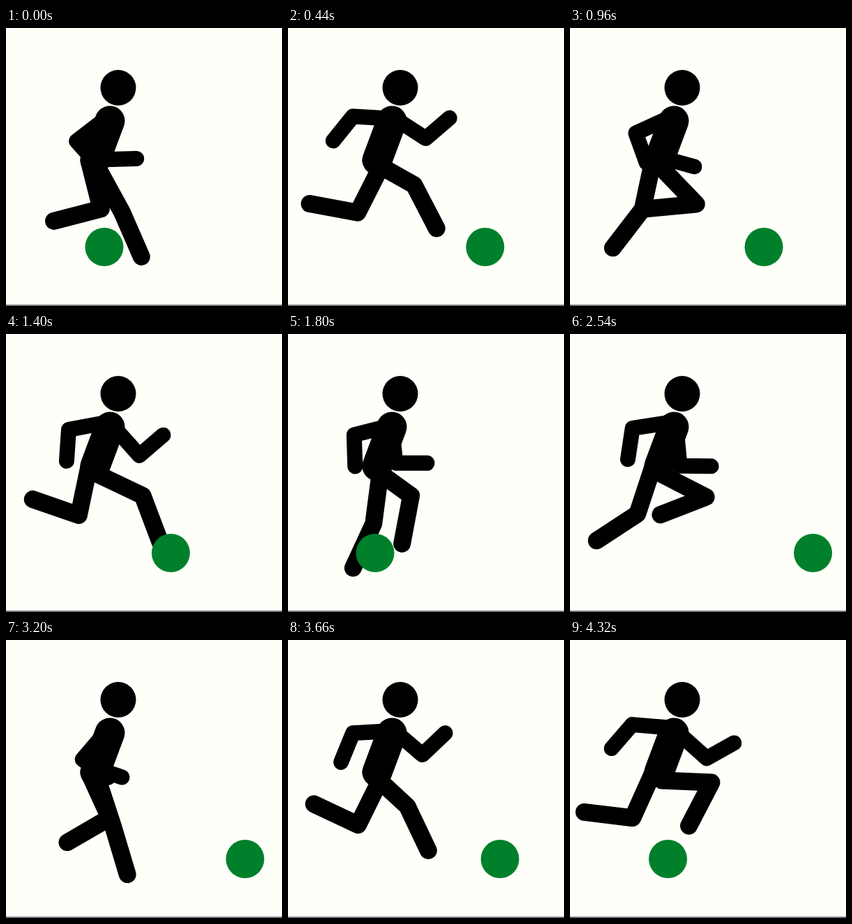
Write an HTML page with a canvas that moves like this. It is 396 px wide and 398 px high and loops after 4420 ms.

```html
<!DOCTYPE html>
<html lang="en">
<head>
<meta charset="utf-8">
<title>Runner and ball</title>
<style>
html, body { margin: 0; height: 100%; overflow: hidden; background: #fffffa; }
canvas { display: block; }
</style>
</head>
<body>
<canvas id="stage" width="396" height="398"></canvas>
<script>
const ctx = document.getElementById('stage').getContext('2d');
const TAU = 2 * Math.PI;
const LOOP = 4420, LAST = 92, STRIDES_PER_STEP = 0.0299;

// Swing in degrees from straight down (positive to the right), as a function of
// the stride phase: a mean, one wave per stride and a smaller one at twice the pace
const swing = (mean, size, peak, size2, peak2) => phase => (mean
  + size * Math.cos(TAU * (phase - peak))
  + size2 * Math.cos(2 * TAU * (phase - peak2))) * Math.PI / 180;

const leg = { length: [71, 70], width: 25, lag: 0 };
const arm = {
  length: [59, 45], width: 22,
  upper: swing(-28, 75, .29, 11, .33),
  lower: swing(52, 84, .292, 14, .455)
};
const LIMBS = [
  { ...leg, x: 119, y: 190, upper: swing(16, 45, .24, 5, .22), lower: swing(-38, 70, .337, 6, .14) },
  { ...leg, x: 132, y: 201, upper: swing(24, 57, .786, 8, .24), lower: swing(-49, 72, .939, 6, .02) },
  { ...arm, x: 148, y: 126, lag: 0 },
  { ...arm, x: 152, y: 130, lag: .51 }
];

function disc(x, y, r, color) {
  ctx.fillStyle = color;
  ctx.beginPath();
  ctx.arc(x, y, r, 0, TAU);
  ctx.fill();
}

function stroke(width, points) {
  ctx.lineWidth = width;
  ctx.beginPath();
  points.forEach(([x, y]) => ctx.lineTo(x, y));
  ctx.stroke();
}

function drawLimb({ x, y, length, width, lag, upper, lower }, phase) {
  const reach = ([px, py], angle, len) => [px + len * Math.sin(angle), py + len * Math.cos(angle)];
  const joint = reach([x, y], upper(phase - lag), length[0]);
  stroke(width, [[x, y], joint, reach(joint, lower(phase - lag), length[1])]);
}

// A kick sends the ball out fast; it slows down and rolls back. u runs from 0 to 1
const roll = (u, from, to, reach) =>
  from + (to - from) * u + reach * Math.abs(Math.sin(Math.PI * u ** .726)) ** .45;

const ballX = step => step < 38
  ? roll(step / 38, 141, 125, 151)
  : roll((step - 38) / (LAST - 38), 125, 140.5, 221);

// Steps last 20, 100 and 20 ms in turn
function stepAt(ms) {
  const rest = ms % 140;
  return Math.min(LAST, 3 * Math.floor(ms / 140) + (rest >= 20) + (rest >= 120));
}

function draw(step) {
  ctx.fillStyle = '#fffffa';
  ctx.fillRect(0, 0, 396, 398);
  ctx.fillStyle = '#777780';
  ctx.fillRect(0, 396, 396, 2);

  ctx.strokeStyle = '#000';
  ctx.lineCap = ctx.lineJoin = 'round';
  disc(161, 85.5, 25.5, '#000');
  stroke(43, [[149, 133], [128, 189]]);
  LIMBS.forEach(limb => drawLimb(limb, step * STRIDES_PER_STEP));
  disc(ballX(step), 313.5, 27.5, '#00802a');
}

const start = performance.now();
function tick() {
  draw(stepAt((performance.now() - start) % LOOP));
  requestAnimationFrame(tick);
}
tick();
</script>
</body>
</html>
```
